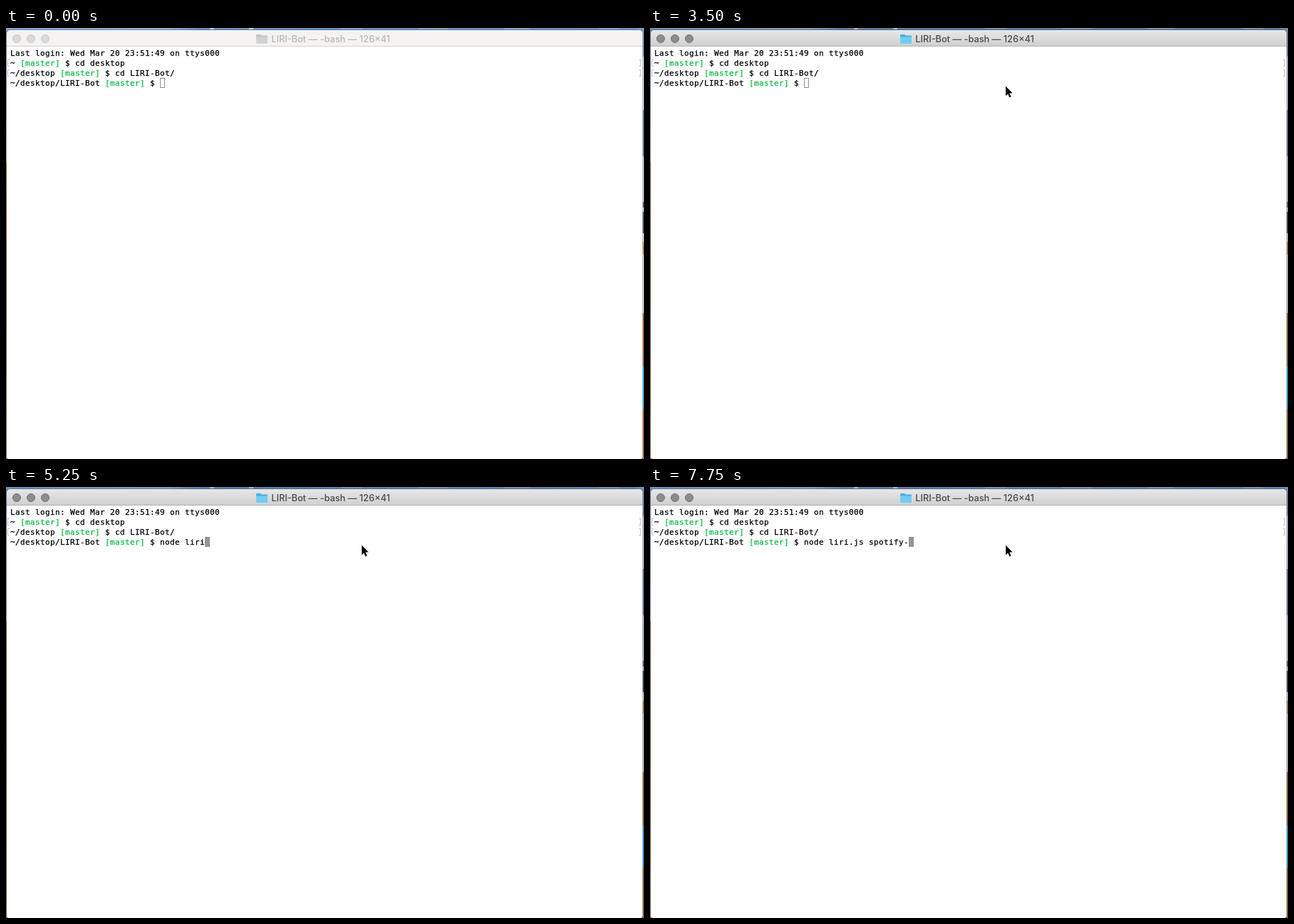
Animation of 895 by 605 pixels, one loop 8 s. Source, as an HTML page:

```html
<!DOCTYPE html>
<html lang="en">
<head>
<meta charset="utf-8">
<title>Terminal</title>
<style>
html, body { margin: 0; width: 100%; height: 100%; overflow: hidden; background: #fff; }
svg { display: block; width: 895px; height: 605px; }
.term { font: 11px "DejaVu Sans Mono", monospace; letter-spacing: calc(7px - 1ch); white-space: pre; stroke: #000; stroke-width: .25; }
.green { fill: #0dba45; stroke: #0dba45; }
.marks { fill: none; stroke: #bdbdbd; }
.title { font: 500 12.75px Inter, sans-serif; text-anchor: middle; fill: #b8b8b8; }
.bar { fill: #f4f3f2; }
.edge { fill: #d3d3d3; }
.outline { fill: #fff; stroke: #000; stroke-opacity: .2; stroke-width: 2; }
.lights { fill: #dadada; stroke: #c9c9c9; }
.folder { fill: #d2d2d2; }
.flap { fill: #c4c4c4; }
.shade { opacity: 0; }
.block { fill: #fff; stroke: #8f8f8f; }
.active .title { fill: #4a4a4a; }
.active .bar { fill: url(#metal); }
.active .edge { fill: #b0b0b0; }
.active .lights { fill: #8c8c8c; stroke: #727272; }
.active .folder { fill: #6fcdf4; }
.active .flap { fill: #47b1e2; }
.active .shade { opacity: .12; }
.solid .block { fill: #949494; stroke: #949494; }
</style>
</head>
<body>
<svg id="stage" viewBox="0 0 895 605">
  <defs>
    <linearGradient id="metal" x2="0" y2="1">
      <stop stop-color="#e7e7e7"/><stop offset="1" stop-color="#d0d0d0"/>
    </linearGradient>
    <linearGradient id="sky">
      <stop stop-color="#7fa4d0"/><stop offset=".25" stop-color="#94b4d9"/>
      <stop offset=".3" stop-color="#6d93c1"/><stop offset="1" stop-color="#7095c2"/>
    </linearGradient>
    <linearGradient id="side" x2="0" y2="1">
      <stop stop-color="#7194c0"/><stop offset=".305" stop-color="#a3bad6"/>
      <stop offset=".31" stop-color="#a37540"/><stop offset=".6" stop-color="#8f6238"/>
      <stop offset="1" stop-color="#a97c52"/>
    </linearGradient>
  </defs>
  <g id="desk">
    <rect width="895" height="10" fill="url(#sky)"/>
    <rect y="3" width="9" height="602" fill="url(#side)"/>
  </g>
  <rect class="shade" width="895" height="605"/>
  <path class="outline" d="M1 8a5 5 0 0 1 5-5H888a5 5 0 0 1 5 5V601a4 4 0 0 1-4 4H5a4 4 0 0 1-4-4z"/>
  <path fill="#fff" d="M1 25H893V601a4 4 0 0 1-4 4H5a4 4 0 0 1-4-4z"/>
  <path class="bar" d="M1 25V8a5 5 0 0 1 5-5H888a5 5 0 0 1 5 5V25z"/>
  <rect class="edge" x="1" y="25" width="892" height="1"/>
  <g class="lights">
    <circle cx="15" cy="15" r="5.5"/><circle cx="35" cy="15" r="5.5"/><circle cx="55" cy="15" r="5.5"/>
  </g>
  <path class="flap" d="M351 21V10q0-1 1-1h5l1.500 1.500H366q1 0 1 1V21z"/>
  <path class="folder" d="M351 12.500H367V21q0 1-1 1H352q-1 0-1-1z"/>
  <text class="title" x="455.500" y="20">LIRI-Bot — -bash — 126×41</text>
  <path class="marks" d="M5 44.500H2.500V53.500H5M5 58.500H2.500V67.500H5M888 44.500H890.500V53.500H888M888 58.500H890.500V67.500H888"/>
  <g class="term">
    <text x="6" y="39">Last login: Wed Mar 20 23:51:49 on ttys000</text>
    <text x="6" y="53">~ <tspan class="green">[master]</tspan> $ cd desktop</text>
    <text x="6" y="67">~/desktop <tspan class="green">[master]</tspan> $ cd LIRI-Bot/</text>
    <text x="6" y="81">~/desktop/LIRI-Bot <tspan class="green">[master]</tspan> $</text>
    <text id="typed" x="216" y="81"></text>
  </g>
  <rect id="block" class="block" x="216.500" y="70.500" width="6" height="13"/>
  <path id="arrow" d="M0 0V13.500L3.100 10.700L5.300 15.800L7.500 14.900L5.300 9.800H9.600z" stroke="#fff" stroke-width="1.600" paint-order="stroke"/>
</svg>
<script>
const $ = id => document.getElementById(id);
const LOOP = 8000, CELL = 7, command = "node liri.js spotify-";

// [time, x, y] of the pointer
const pointer = [[0, -50, -50], [250, 413, 254], [500, 557, 8], [750, 562.8, 2.3], [3500, 499, 81.7]];
// [time, characters typed]
const typing = [[0, 0], [4000, 1], [4250, 2], [4750, 4], [5000, 6], [5250, 9], [5750, 10],
  [6000, 11], [6250, 13], [6500, 15], [6750, 16], [7250, 19], [7500, 20], [7750, 21]];

// Bits of the desktop showing around the window: [start, end, colour]
const topBits = [[286, 292, "#c3d2e4"], [341, 347, "#c3d2e4"], [470, 500, "#86a6cc"],
  [578, 620, "#86a6cc"], [698, 735, "#86a6cc"], [832, 860, "#86a6cc"]];
const rightBits = [[0, 40, "#7f9fc6"], [40, 115, "#c3cedc"], [115, 180, "#7492b9"],
  [180, 258, "#c3cad3"], [244, 252, "#777"], [258, 288, "#5b6371"], [288, 300, "#d8d3cd"],
  [300, 318, "#c99a62"], [318, 400, "#cfcfcf"], [400, 475, "#a8774a"],
  [475, 535, "#48b4d8"], [535, 605, "#a8774a"]];

function bit(x, y, width, height, fill) {
  const rect = document.createElementNS("http://www.w3.org/2000/svg", "rect");
  for (const [key, value] of Object.entries({ x, y, width, height, fill })) rect.setAttribute(key, value);
  $("desk").append(rect);
}
topBits.forEach(([a, b, fill]) => bit(a, 0, b - a, 2, fill));
rightBits.forEach(([a, b, fill]) => bit(885, a, 10, b - a, fill));

const latest = (steps, t) => steps.findLast(step => step[0] <= t);

function draw(t) {
  const [, x, y] = latest(pointer, t);
  const count = latest(typing, t)[1];
  $("arrow").setAttribute("transform", `translate(${x} ${y})`);
  $("typed").textContent = command.slice(0, count);
  $("block").setAttribute("x", 216.5 + count * CELL);
  $("stage").classList.toggle("active", t >= 3500);
  $("stage").classList.toggle("solid", t >= 3750);
}

const start = performance.now();
function tick() {
  draw((performance.now() - start) % LOOP);
  requestAnimationFrame(tick);
}
tick();
</script>
</body>
</html>
```
